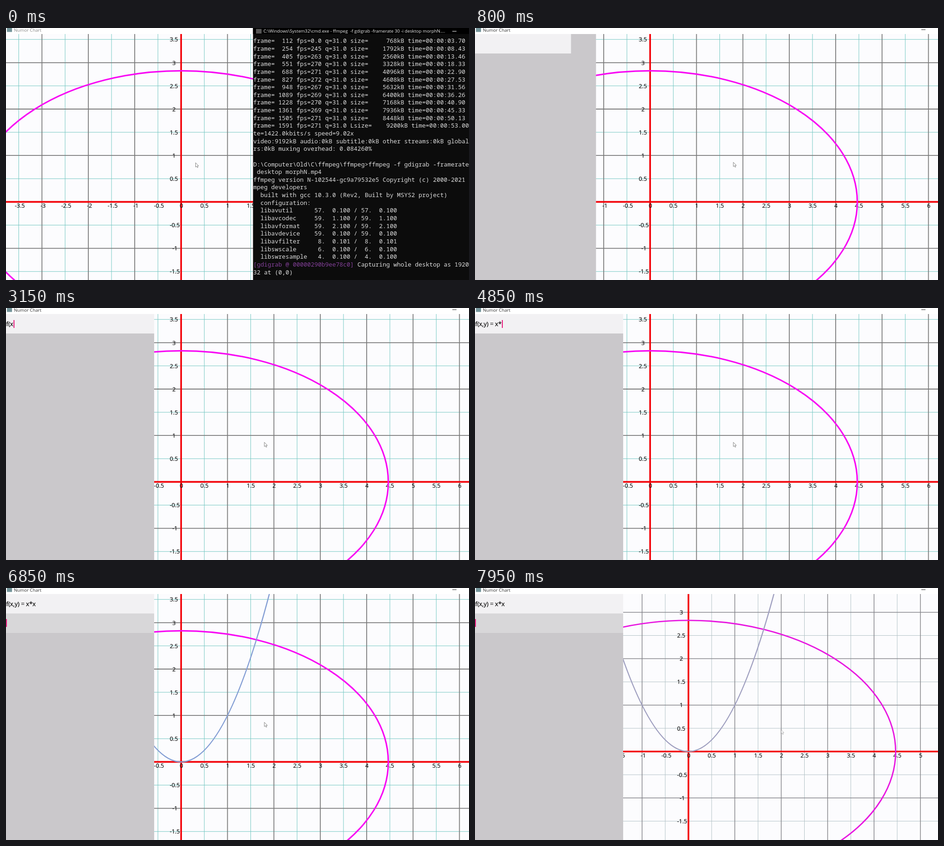
An HTML page for the animation above (8000 ms loop, 1000 by 544 pixels).

```html
<!DOCTYPE html>
<html lang="en">
<head>
<meta charset="utf-8">
<title>Numor Chart</title>
<style>
html, body { margin: 0; width: 100%; height: 100%; overflow: hidden; background: #fff; }
svg { display: block; width: 100vw; height: 100vh; }
text { white-space: pre; font-family: "Open Sans", "Noto Sans", sans-serif; }
.num { font-size: 12.5px; fill: #111; stroke: #111; stroke-width: .2; }
.bar { font-size: 9.7px; }
.formula { font-size: 13px; fill: #111; stroke: #111; stroke-width: .3; }
.term { font: 12.95px "Noto Sans Mono", "DejaVu Sans Mono", monospace; fill: #dcdcdc; }
</style>
</head>
<body>
<svg id="stage" viewBox="0 0 1000 544" preserveAspectRatio="none"></svg>
<script>
const LOOP = 8000, STEP = 50;
const OX = 378.2, OY = 375.4, UNIT = 100.2;
const stage = document.getElementById('stage');

function add(parent, tag, attrs, text) {
  const el = document.createElementNS('http://www.w3.org/2000/svg', tag);
  set(el, attrs);
  if (text !== undefined) el.textContent = text;
  parent.appendChild(el);
  return el;
}
function set(el, attrs) {
  for (const k in attrs) el.setAttribute(k, attrs[k]);
}
const rect = (p, x, y, width, height, fill) => add(p, 'rect', { x, y, width, height, fill });
const label = (p, x, y, cls, text) => add(p, 'text', { x, y, class: cls }, text);
const clamp = (v, lo, hi) => Math.min(hi, Math.max(lo, v));
const phase = (t, a, b) => clamp((t - a) / (b - a), 0, 1);
const smooth = p => p * p * (3 - 2 * p);
const mix = (a, b, p) => a + (b - a) * p;
const blend = (a, b, p) => `rgb(${a.map((v, i) => Math.round(mix(v, b[i], p)))})`;
const px = x => OX + x * UNIT;
const py = y => OY - y * UNIT;

// Graph
rect(stage, 0, 0, 1000, 544, '#fcfcfe');
const graph = add(stage, 'g', {});

function gridPath(whole) {
  let d = '';
  for (let i = -10; i <= 16; i++) {
    if ((i % 2 === 0) !== whole) continue;
    d += `M${px(i / 2)} -200V800M-300 ${py(i / 2)}H1300`;
  }
  return add(graph, 'path', { d, fill: 'none' });
}
const halves = gridPath(false);
const wholes = gridPath(true);
add(graph, 'path', { d: `M${OX} -200V800M-300 ${OY}H1300`, stroke: '#f3040a', 'stroke-width': 3.6 });

for (let i = -9; i <= 13; i++) {
  const shift = i % 2 ? 8.5 : 3;
  label(graph, px(i / 2) - shift, OY + 13, 'num', i / 2);
  if (i) label(graph, OX - 16 - shift, py(i / 2) + 4.7, 'num', i / 2);
}

const ellipse = add(graph, 'ellipse', {
  cx: OX, cy: OY + 0.3, rx: Math.sqrt(20) * UNIT - 0.6, ry: Math.sqrt(8) * UNIT, fill: 'none'
});
const parabola = add(graph, 'path', {
  d: `M${px(-2.5)} ${py(6.25)}Q${OX} ${py(-6.25)} ${px(2.5)} ${py(6.25)}`, fill: 'none'
});

// Side panel
const panel = rect(stage, 0, 13, 320, 531, '#cac8cb');
const field = rect(stage, 0, 13, 320, 42, '#f2f1f3');
const nextRow = rect(stage, 0, 55, 320, 42, '#d8d7d9');
const formula = label(stage, 0.5, 39, 'formula', '');
const caret = rect(stage, 0, 26, 2, 17, '#e8187c');

// Window title
rect(stage, 0, 0, 1000, 13, '#fff');
rect(stage, 2, 0, 11, 8.5, '#74949a');
const title = label(stage, 17, 8, 'bar', 'Numor Chart');
rect(stage, 964, 3, 9, 1.2, '#444');

// Terminal
const term = add(stage, 'g', {});
rect(term, 533.5, 0, 467, 544, '#0c0c0c');
rect(term, 533.5, 0, 467, 13, '#000');
rect(term, 540, 2, 12, 10, '#555');
const head = label(term, 556, 10.3, 'bar',
  'C:\\Windows\\System32\\cmd.exe - ffmpeg  -f gdigrab -framerate 30 -i desktop morphN....');
head.style.fill = '#eee';
rect(term, 964, 6.5, 9, 1.2, '#ddd');

const progress = [
  '112 0.0 768 03.70', '254 245 1792 08.43', '405 263 2560 13.46', '551 270 3328 18.33',
  '688 271 4096 22.90', '827 272 4608 27.53', '948 267 5632 31.56', '1089 269 6400 36.26',
  '1228 270 7168 40.90', '1361 269 7936 45.33', '1505 271 8448 50.13', '1591 271 9200 53.00'
].map((row, i) => {
  const [n, fps, size, sec] = row.split(' ');
  const name = i === 11 ? 'Lsize=' : 'size=';
  return `frame=${n.padStart(5)} fps=${fps} q=31.0 ${name}${size.padStart(8)}kB time=00:00:${sec}`;
});
const libs = [
  'avutil 57 0', 'avcodec 59 1', 'avformat 59 2', 'avdevice 59 0',
  'avfilter 8 0 101', 'swscale 6 0', 'swresample 4 0'
].map(row => {
  const [name, major, minor, micro = '100'] = row.split(' ');
  const v = `${major.padStart(2)}.${minor.padStart(3)}.${micro}`;
  return `  lib${name.padEnd(11)} ${v} / ${v}`;
});
const device = '[gdigrab @ 00000290b9ee78c0]';
const lines = [
  ...progress,
  'te=1422.0kbits/s speed=9.02x',
  'video:9192kB audio:0kB subtitle:0kB other streams:0kB global',
  'rs:0kB muxing overhead: 0.084260%',
  '',
  'D:\\Computer\\Old\\C\\ffmpeg\\ffmpeg>ffmpeg -f gdigrab -framerate',
  ' desktop morphN.mp4',
  'ffmpeg version N-102544-gc9a79532e5 Copyright (c) 2000-2021',
  'mpeg developers',
  '  built with gcc 10.3.0 (Rev2, Built by MSYS2 project)',
  '  configuration:',
  ...libs,
  device + ' Capturing whole desktop as 1920',
  '32 at (0,0)'
];
lines.forEach((line, i) => {
  const el = label(term, 534, 32.3 + i * 16.64, 'term', line);
  if (!line.startsWith(device)) return;
  el.textContent = '';
  add(el, 'tspan', { fill: '#84409a' }, device);
  add(el, 'tspan', {}, line.slice(device.length));
});

const cursor = add(stage, 'path', {
  d: 'M0 0V9.4L2.2 7.5L3.8 10.8L5.3 10L3.8 6.9H6.5Z',
  fill: '#fff', stroke: '#777', 'stroke-width': 0.9
});

const expr = 'f(x,y) = x*x';
const keys = [2700, 2900, 3150, 3450, 3600, 3800, 3900, 4000, 4200, 4400, 4550, 5700];
const ENTER = 6250;

function draw(t) {
  term.style.display = t < 50 ? '' : 'none';
  title.style.fill = t < 50 ? '#888' : '#333';

  // The field trails the panel edge by one step.
  const slide = at => clamp((at - 558) * 1.08, 0, 320);
  set(panel, { width: slide(t) });
  set(field, { width: slide(t - STEP) });

  formula.textContent = expr.slice(0, keys.filter(k => t >= k).length);
  const entered = t >= ENTER;
  nextRow.style.display = entered ? '' : 'none';
  caret.style.display = t >= 1700 ? '' : 'none';
  const width = formula.textContent ? formula.getComputedTextLength() : 0;
  set(caret, { x: entered || !width ? 0 : width + 1.2, y: entered ? 67 : 26 });

  // Lines soften while the graph is dragged.
  const drag = phase(t, 7400, 7950);
  const dx = 82.8 * drag, dy = -22.4 * drag;
  set(graph, { transform: `translate(${dx} ${dy})` });
  const soft = phase(t, 7400, 7600);
  set(halves, { stroke: blend([116, 199, 194], [178, 194, 198], soft), 'stroke-width': 1 });
  set(wholes, { stroke: blend([122, 122, 122], [134, 134, 139], soft), 'stroke-width': mix(1.8, 1.5, soft) });
  set(ellipse, { stroke: blend([248, 8, 244], [232, 24, 224], soft), 'stroke-width': mix(3.2, 2.9, soft) });
  set(parabola, {
    stroke: blend([132, 158, 212], [160, 160, 192], soft),
    'stroke-width': 2.5, opacity: phase(t, 6200, 6450)
  });

  const move = smooth(phase(t, 250, 600));
  const reach = smooth(phase(t, 7150, 7400));
  const cx = mix(409.5, 558, move) + 20 * reach + dx;
  const cy = mix(290.8, 289.8, move) + 38 * reach + dy;
  set(cursor, { transform: `translate(${cx} ${cy})`, opacity: mix(1, 0.6, soft) });
}

const start = performance.now();
function tick() {
  const t = (performance.now() - start) % LOOP;
  draw(Math.floor(t / STEP) * STEP);
  requestAnimationFrame(tick);
}
draw(0);
requestAnimationFrame(tick);
</script>
</body>
</html>
```
